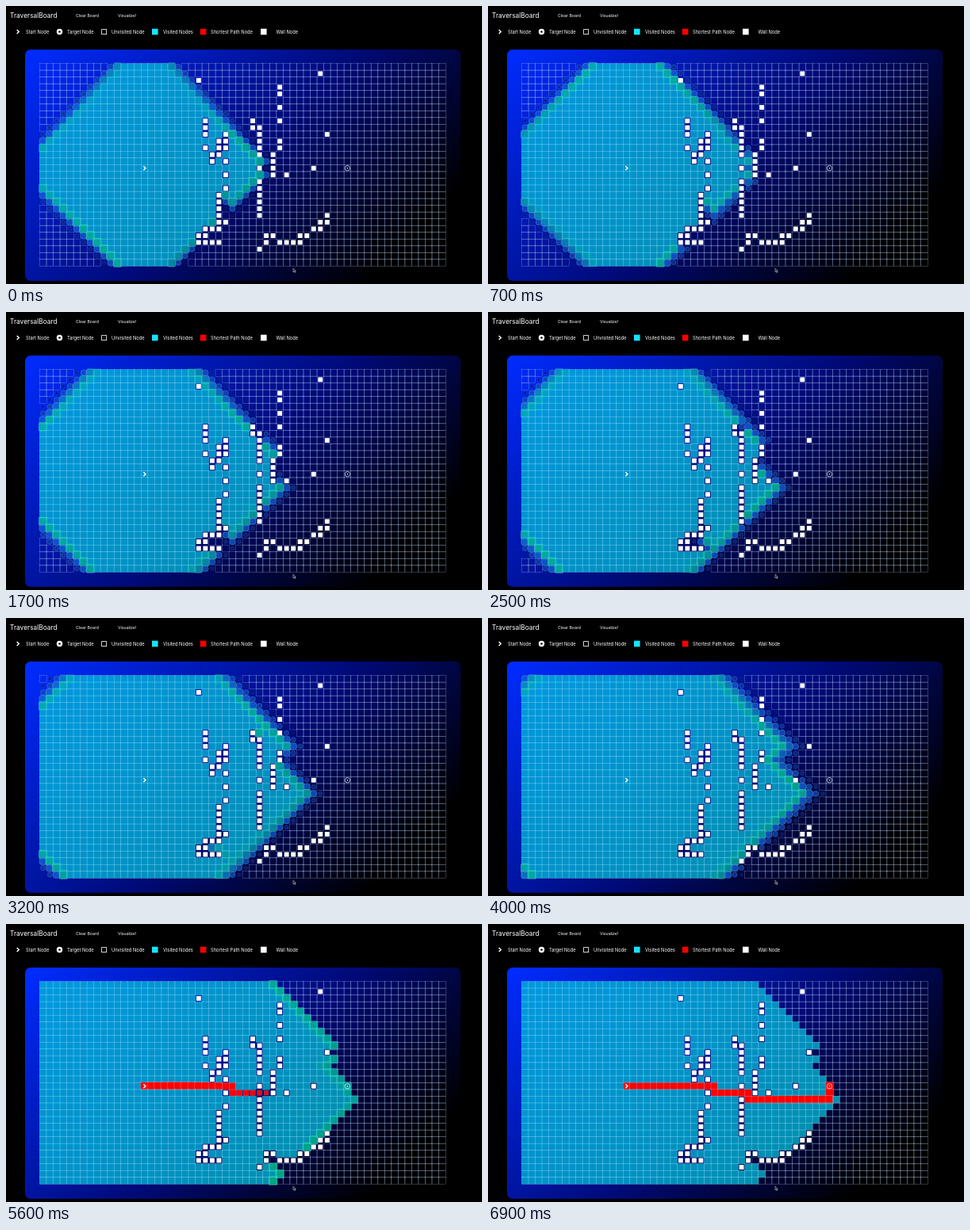
Write an HTML page that moves like this. It is 600 px wide and 351 px high and loops after 7 s.

```html
<!DOCTYPE html>
<html lang="en">
<head>
<meta charset="utf-8">
<title>TraversalBoard</title>
<style>
  html, body { margin: 0; width: 100%; height: 100%; overflow: hidden; background: #000; }
  svg { display: block; width: 100vw; height: 100vh; }
  text { font-family: Inter, "Liberation Sans", sans-serif; fill: #fff; }
  .title { font-size: 8.35px; }
  .nav { font-size: 5.2px; }
  .legend { font-size: 5.75px; }
  .cell { fill: none; stroke: #bed7fa; stroke-opacity: .7; stroke-width: .34; }
</style>
</head>
<body>
<svg viewBox="0 0 600 351">
  <defs>
    <linearGradient id="sky" gradientUnits="userSpaceOnUse" x1="88.2" y1="-9.3" x2="508.8" y2="411.3">
      <stop offset="0" stop-color="#002cff"/>
      <stop offset=".5" stop-color="#000a78"/>
      <stop offset=".86" stop-color="#000"/>
    </linearGradient>
    <path id="chevron" d="M-1.3 -2.5 L1.3 0 L-1.3 2.5" fill="none" stroke="#fff" stroke-width="1.4"/>
  </defs>
  <rect width="600" height="351"/>

  <text class="title" x="5" y="15.4">TraversalBoard</text>
  <text class="nav" x="88" y="14">Clear Board</text>
  <text class="nav" x="141" y="14">Visualize!</text>

  <use href="#chevron" x="15" y="32.5"/>
  <circle cx="67.5" cy="32.5" r="3.7" fill="#fff"/>
  <circle cx="67.5" cy="32.5" r="1.3"/>
  <rect x="120.6" y="29.6" width="6" height="6" fill="none" stroke="#fff" stroke-width=".8"/>
  <rect x="184" y="28.7" width="7.6" height="7.6" fill="#14e4ff"/>
  <rect x="244.8" y="28.7" width="7.6" height="7.6" fill="#f00"/>
  <rect x="321" y="28.7" width="7.6" height="7.6" fill="#fff"/>
  <g class="legend">
    <text x="25" y="34.6">Start Node</text>
    <text x="77" y="34.6">Target Node</text>
    <text x="133" y="34.6">Unvisited Node</text>
    <text x="198" y="34.6">Visited Nodes</text>
    <text x="258" y="34.6">Shortest Path Node</text>
    <text x="340.5" y="34.6">Wall Node</text>
  </g>

  <rect x="24" y="55" width="549" height="292" rx="7" fill="url(#sky)"/>
  <g id="base"></g>
  <g id="live"></g>
  <use id="start" href="#chevron"/>
  <g id="goal" fill="none" stroke="#fff" stroke-width=".7">
    <circle r="3.2"/>
    <circle r=".8" fill="#fff" stroke="none"/>
  </g>
  <path d="M362 331.4 v4.4 l1.1 -.9 .8 1.7 .8 -.4 -.8 -1.6 1.4 -.1 z" fill="#000" stroke="#fff" stroke-width=".5"/>
</svg>
<script>
const COLS = 60, ROWS = 30, SIZE = 8.525, LEFT = 42.5, TOP = 72.6;
const LOOP = 7000, TICK = 100;
const VISIT_STEP = 10.2, PATH_STEP = 50, PATH_START = 4640, GROW = 1500;
const START = 15 * COLS + 15, GOAL = 15 * COLS + 45;

// column: rows
const WALLS = `23:2,25-26 24:8-10,12,24-26 25:13-14,24,26 26:11-13,19-24,26
  27:10-12,14,16,18,23 31:8-9 32:9-13,15,17-22,27 33:25-26 34:13-16,25
  35:3-4,6,8,11-12,26 36:16,26 37:26 38:25-26 39:25 40:15,24 41:1,23-24 42:10,22-23`;

const VISIT_COLORS = [
  [0, [0, 0, 66]], [.5, [17, 104, 217]], [.75, [0, 217, 159]], [1, [0, 190, 218]]
];
const VISIT_SCALE = [[0, .3], [.75, 1.2], [1, 1]];
const PATH_SCALE = [[0, .6], [.5, 1.2], [1, 1]];

const $ = id => document.getElementById(id);
const centerX = i => LEFT + (i % COLS + .5) * SIZE;
const centerY = i => TOP + (Math.floor(i / COLS) + .5) * SIZE;
const place = i => `translate(${centerX(i).toFixed(2)} ${centerY(i).toFixed(2)})`;

function parseWalls() {
  const walls = new Set();
  for (const entry of WALLS.split(/\s+/)) {
    const [col, runs] = entry.split(':');
    for (const run of runs.split(',')) {
      const [from, to = from] = run.split('-').map(Number);
      for (let row = from; row <= to; row++) walls.add(row * COLS + +col);
    }
  }
  return walls;
}

function neighbours(i) {
  const col = i % COLS, list = [];
  if (i >= COLS) list.push(i - COLS);
  if (col > 0) list.push(i - 1);
  if (col < COLS - 1) list.push(i + 1);
  if (i < COLS * (ROWS - 1)) list.push(i + COLS);
  return list;
}

// Breadth-first search; the last visited neighbour becomes the parent.
function search(walls) {
  const queue = [START], seen = new Set(queue), done = new Set(), parent = {};
  for (const node of queue) {
    done.add(node);
    if (node === GOAL) break;
    for (const next of neighbours(node)) {
      if (walls.has(next) || done.has(next)) continue;
      parent[next] = node;
      if (!seen.has(next)) { seen.add(next); queue.push(next); }
    }
  }
  const path = [];
  for (let n = GOAL; n !== undefined; n = parent[n]) path.unshift(n);
  return { order: [...done], path };
}

// cubic-bezier(0, 0, .58, 1)
function easeOut(x) {
  let lo = 0, hi = 1;
  for (let k = 0; k < 16; k++) {
    const s = (lo + hi) / 2;
    if (1.74 * s * s * (1 - s) + s * s * s < x) lo = s; else hi = s;
  }
  return lo * lo * (3 - 2 * lo);
}

const mix = (a, b, k) => Array.isArray(a) ? a.map((v, j) => mix(v, b[j], k)) : a + (b - a) * k;

function track(keys, p) {
  if (p >= 1) return keys[keys.length - 1][1];
  const n = keys.findIndex(key => key[0] > p);
  const [p0, a] = keys[n - 1], [p1, b] = keys[n];
  return mix(a, b, easeOut((p - p0) / (p1 - p0)));
}

function addRect(parent, side, attrs) {
  const rect = document.createElementNS('http://www.w3.org/2000/svg', 'rect');
  const all = { x: -side / 2, y: -side / 2, width: side, height: side, ...attrs };
  for (const name in all) rect.setAttribute(name, all[name]);
  parent.appendChild(rect);
  return rect;
}

const CELL = SIZE + .34;
const walls = parseWalls();
const { order, path } = search(walls);
const visitStart = PATH_START - order.length * VISIT_STEP;
const visitTime = new Map(order.map((n, k) => [n, visitStart + k * VISIT_STEP]));
const pathTime = new Map(path.map((n, k) => [n, PATH_START + k * PATH_STEP]));
const cells = [];

for (let i = 0; i < COLS * ROWS; i++) {
  const transform = place(i);
  if (walls.has(i)) {
    addRect($('base'), 5.9, { transform, fill: '#fff' });
    continue;
  }
  const visited = visitTime.has(i);
  const rect = addRect($(visited ? 'live' : 'base'), CELL, { transform, class: 'cell' });
  if (visited) cells.push({ rect, at: transform, visit: visitTime.get(i), red: pathTime.get(i), last: '' });
}
$('start').setAttribute('transform', place(START));
$('goal').setAttribute('transform', place(GOAL));

function look(cell, t) {
  if (t >= cell.red) {
    return { scale: track(PATH_SCALE, (t - cell.red) / GROW), round: 0, fill: '#f00' };
  }
  if (t < cell.visit) return { scale: 1, round: 0, fill: 'none' };
  const p = Math.min(1, (t - cell.visit) / GROW);
  const rgb = track(VISIT_COLORS, p).map(Math.round);
  return {
    scale: track(VISIT_SCALE, p),
    round: p < 1 ? Math.min(.5, 1 - easeOut(p)) * CELL : 0,
    fill: `rgba(${rgb},.75)`
  };
}

function draw(t) {
  for (const cell of cells) {
    const { scale, round, fill } = look(cell, t);
    const key = scale.toFixed(3) + round.toFixed(2) + fill;
    if (key === cell.last) continue;
    cell.last = key;
    cell.rect.setAttribute('transform', `${cell.at} scale(${scale.toFixed(3)})`);
    cell.rect.setAttribute('rx', round.toFixed(2));
    cell.rect.style.fill = fill;
  }
}

const origin = performance.now();
function frame() {
  const t = (performance.now() - origin) % LOOP;
  const tick = Math.floor(t / TICK) * TICK;
  draw(tick < 2 * TICK ? 0 : tick);
  requestAnimationFrame(frame);
}
frame();
</script>
</body>
</html>
```
